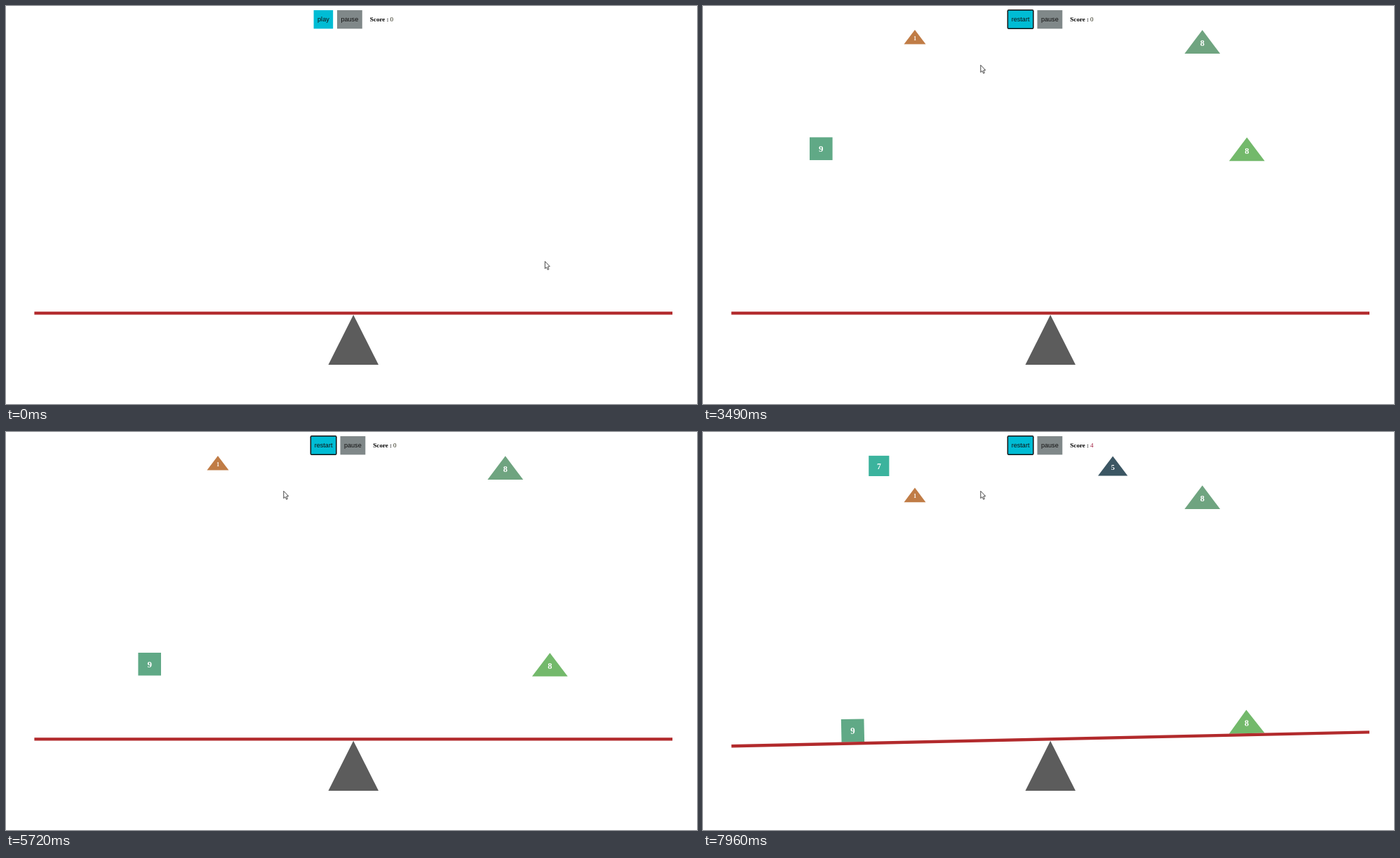
Write an HTML page with a canvas that moves like this. It is 985 px wide and 568 px high and loops after 8000 ms.

```html
<!DOCTYPE html>
<html lang="en">
<head>
<meta charset="utf-8">
<title>Balance game</title>
<style>
  html, body { margin: 0; width: 100%; height: 100%; overflow: hidden; background: #fff; }
  canvas { display: block; }
</style>
</head>
<body>
<canvas id="stage" width="985" height="568"></canvas>
<script>
const ctx = document.getElementById('stage').getContext('2d');
const SANS = '"Liberation Sans", Arial, sans-serif';
const SERIF = '"Liberation Serif", "Times New Roman", serif';

const LOOP = 8000, CLICK = 744, LAND = 7214, TILT = 7530, TILT_END = 7960;
const SPEED = 0.0563;
const PIVOT = { x: 495.2, y: 438.3 };
const BEAM_TOP = 436.2;
const MAX_TILT = -1.25 * Math.PI / 180;

// [time, bottom edge] of the first falling pair
const FALL = [[CLICK, 68], [1490, 109.9], [3490, 221.2], [4290, 268.4],
              [5720, 348.8], [6760, 406], [LAND, 431.6]];
// times at which the left block is nudged to the right
const NUDGES = [2200, 2690, 2890, 3100, 3700, 3950, 5250, 5500, 6250];
const NUDGE = 9.1;
// [time, x, y] of the pointer tip
const POINTER = [[0, 768, 364], [640, 452, 18], [880, 452, 18], [1400, 395.5, 83.8]];

const clamp01 = v => Math.min(1, Math.max(0, v));
const mix = (a, b, k) => a + (b - a) * k;
const smooth = k => k * k * (3 - 2 * k);

function track(keys, t, col, ease = k => k) {
  if (t <= keys[0][0]) return keys[0][col];
  for (let i = 1; i < keys.length; i++) {
    const a = keys[i - 1], b = keys[i];
    if (t <= b[0]) return mix(a[col], b[col], ease((t - a[0]) / (b[0] - a[0])));
  }
  return keys[keys.length - 1][col];
}

function text(str, x, y, font, color, align = 'center') {
  ctx.font = font;
  ctx.fillStyle = color;
  ctx.textAlign = align;
  ctx.fillText(str, x, y);
}

function poly(points, color) {
  ctx.beginPath();
  points.forEach(([x, y]) => ctx.lineTo(x, y));
  ctx.closePath();
  ctx.fillStyle = color;
  ctx.fill();
}

function rect(x, y, w, h, color) {
  ctx.fillStyle = color;
  ctx.fillRect(x, y, w, h);
}

function weightLabel(weight, x, middle) {
  const size = 6.83 * (1 + weight / 10);
  text(weight, x, middle + size * 0.338, `bold ${size}px ${SERIF}`, '#fff');
}

function triangle(weight, x, bottom, color) {
  const scale = 1 + weight / 10, half = 14.1 * scale, h = 18.7 * scale;
  poly([[x - half, bottom], [x, bottom - h], [x + half, bottom]], color);
  weightLabel(weight, x, bottom - h / 2 + 2);
}

function square(weight, x, bottom, color) {
  const side = 17.15 * (1 + weight / 10);
  rect(x - side / 2, bottom - side, side, side, color);
  weightLabel(weight, x, bottom - side / 2 + 0.3);
}

function header(t) {
  const started = t >= CLICK;
  const font = `9.1px ${SANS}`;
  const dx = started ? 4.5 : 0;
  if (started) {
    ctx.beginPath();
    ctx.roundRect(433.6, 5, 38, 28, 2.2);
    ctx.fillStyle = '#101010';
    ctx.fill();
    rect(435.1, 6.5, 35, 25, '#00bcd4');
    text('restart', 452.6, 22.3, font, '#111');
  } else {
    rect(438.6, 6, 27.6, 26.4, '#00bcd4');
    text('play', 452.4, 22.3, font, '#111');
  }
  rect(472 + dx, 6, 35.8, 26.4, '#808889');
  text('pause', 489.8 + dx, 22.3, font, '#111');

  const scored = t >= LAND + 26;
  const k = clamp01((t - LAND - 26) / 360);
  const color = `rgb(${mix(36, 160, k)}, ${mix(36, 30, k)}, ${mix(16, 62, k)})`;
  text('Score :', 518.8 + dx, 22, `bold 9.1px ${SERIF}`, '#000', 'left');
  text(scored ? 4 : 0, 547.4 + dx, 22, `9.1px ${SERIF}`, color, 'left');
}

function queue(t) {
  if (t < CLICK) return;
  const landed = t >= LAND;
  const drop = landed ? (t - LAND) * SPEED : 0;
  triangle(1, 302, 54.6 + drop + (landed ? 3.5 : 0), '#c07c46');
  triangle(8, 711.8, 67.9 + drop, '#6fa480');
  if (landed) {
    square(7, 250.8, 63, '#3bb39d');
    triangle(5, 584.2, 62.5, '#3b5663');
  }
}

function blocks(t) {
  if (t < CLICK) return;
  const bottom = t < LAND ? track(FALL, t, 1) : BEAM_TOP;
  const steps = NUDGES.filter(n => t >= n).length;
  square(9, 131.9 + steps * NUDGE, t < LAND ? bottom - 1.3 : bottom, '#60a986');
  triangle(8, 775.3, bottom, '#73b96b');
}

function seesaw(t) {
  const tilt = MAX_TILT * clamp01((t - TILT) / (TILT_END - TILT));
  ctx.save();
  ctx.translate(PIVOT.x, PIVOT.y);
  ctx.rotate(tilt);
  ctx.translate(-PIVOT.x, -PIVOT.y);
  blocks(t);
  rect(40.4, BEAM_TOP, 909.6, 4.3, '#b22a2c');
  ctx.restore();
  poly([[459.5, 512], [495.2, 440.7], [531, 512]], '#5c5c5c');
}

function pointer(t) {
  ctx.save();
  ctx.translate(track(POINTER, t, 1, smooth), track(POINTER, t, 2, smooth));
  poly([[0.3, 0.5], [0.3, 10.8], [2.5, 8.8], [4.2, 12.4], [5.8, 11.7],
        [4.3, 8.1], [7.2, 7.7]], '#fff');
  ctx.strokeStyle = '#333';
  ctx.lineWidth = 0.9;
  ctx.stroke();
  ctx.restore();
}

function draw(t) {
  rect(0, 0, 985, 568, '#fff');
  header(t);
  queue(t);
  seesaw(t);
  pointer(t);
}

const start = performance.now();
function tick() {
  draw((performance.now() - start) % LOOP);
  requestAnimationFrame(tick);
}
tick();
</script>
</body>
</html>
```
